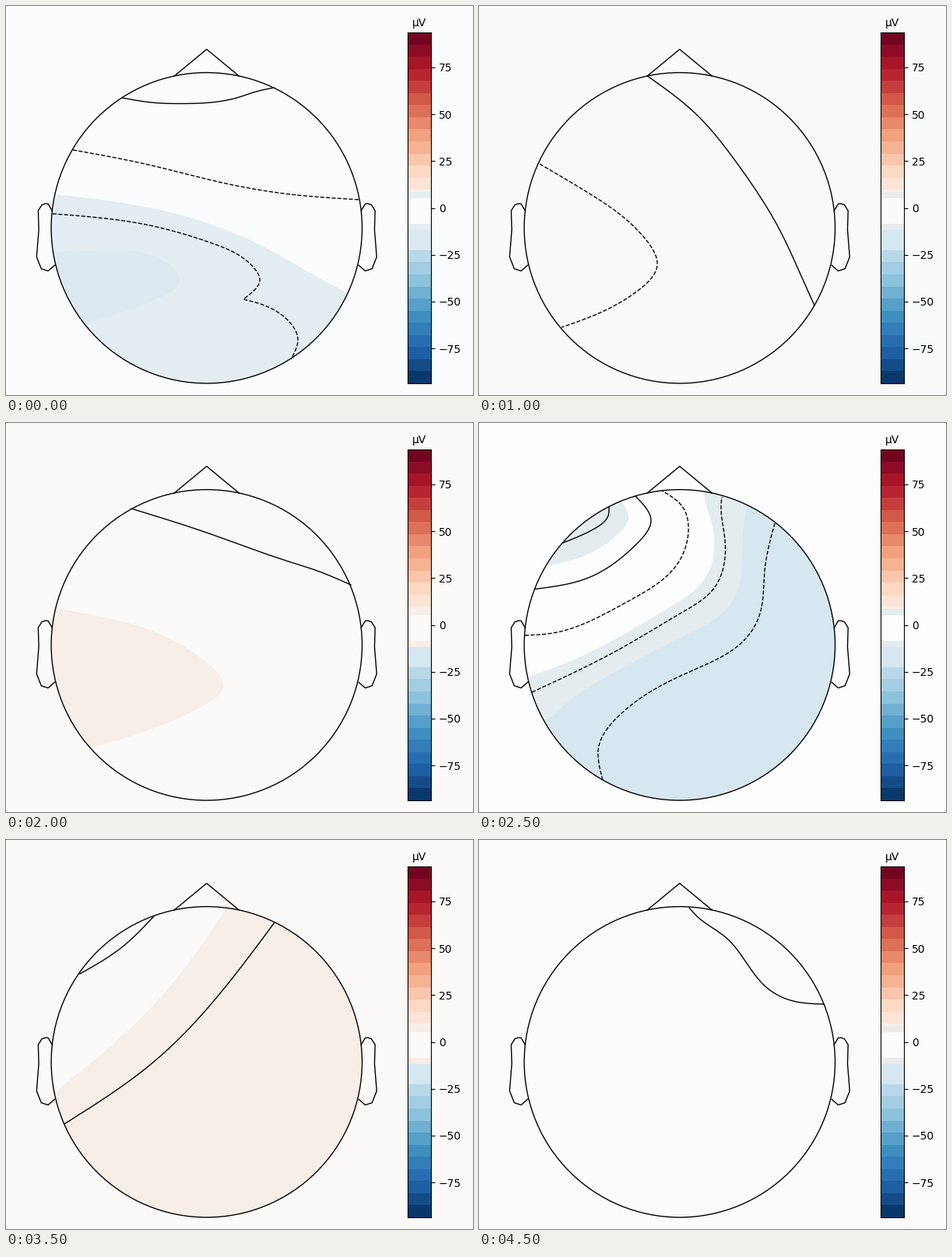
Write a matplotlib script that moves like this. It is 600 px wide and 500 px high and loops after 5000 ms.

```python
import matplotlib
import numpy as np
import matplotlib.pyplot as plt
from matplotlib.animation import FuncAnimation
from matplotlib.patches import Circle, Polygon

W, H, DPI = 600, 500, 100
CX, CY, R = 257.8, 285.3, 199.7
BAR_LEFT, BAR_TOP, BAR_BOTTOM = 516, 34, 485
VMAX, SHADES = 93.6, 29
SAMPLES = 160

# Background, tint next to zero, pale blue
COOL = ("#fbfcfe", "#e4edf2", "#dde9f1")
GREY = ("#f9fbfa", "#eaeaea", "#d5e7f0")
WARM = ("#fcfaf8", "#f7eee8", "#d5e7f0")
ICE = ("#fdfdfd", "#e4ecf0", "#d7e7ef")
ROSE = ("#fdfdfd", "#f8ece7", "#d5e7f0")
PALE = ("#fbfbfb", "#eaeaea", "#d5e7f0")
PEACH, CORAL = "#fae4d8", "#fbddce"


def curve(*points):
    """Natural cubic spline through a few key points."""
    p = np.array(points, float)
    h = np.hypot(*np.diff(p, axis=0).T)
    t = np.r_[0, np.cumsum(h)]
    slope = np.diff(p, axis=0) / h[:, None]
    a, rhs = np.eye(len(p)), np.zeros_like(p)
    for i in range(1, len(p) - 1):
        a[i, i - 1:i + 2] = h[i - 1], 2 * (h[i - 1] + h[i]), h[i]
        rhs[i] = 6 * (slope[i] - slope[i - 1])
    m = np.linalg.solve(a, rhs)
    s = np.linspace(0, t[-1], SAMPLES)
    k = np.clip(np.searchsorted(t, s) - 1, 0, len(h) - 1)
    v = ((s - t[k]) / h[k])[:, None]
    u = 1 - v
    bend = (u**3 - u) * m[k] + (v**3 - v) * m[k + 1]
    return u * p[k] + v * p[k + 1] + bend * h[k, None]**2 / 6


def between(a, b, start, end):
    """Curve lying part of the way from a to b."""
    t = np.linspace(start, end, SAMPLES)[:, None]
    return (1 - t) * a + t * b


def region(edge):
    """Close an edge clockwise along an arc just outside the head."""
    ends = edge[[-1, 0]] - (CX, CY)
    a, b = np.arctan2(ends[:, 1], ends[:, 0])
    if b < a:
        b += 2 * np.pi
    s = np.linspace(a, b, 80)
    arc = np.c_[CX + 1.06 * R * np.cos(s), CY + 1.06 * R * np.sin(s)]
    return np.vstack([edge, arc])


# Each state returns palette, fills, solid contours, dashed contours.
def left_low():
    slope = curve((64, 242), (210, 265), (330, 309), (396, 346), (437, 368))
    lobe = curve((61, 316), (130, 314), (205, 329), (224, 350), (180, 382),
                 (109, 406))
    zero = curve((149, 118), (187, 124), (226, 125.5), (300, 117), (318, 111),
                 (344, 105))
    upper = curve((86, 185), (183, 204), (275, 226.5), (365, 242), (455, 249))
    bend = curve((60, 267), (180, 281), (265, 305), (318, 336), (326, 350),
                 (305, 377))
    tail = curve((305, 377), (350, 394), (375, 430), (366, 454))
    lower = np.vstack([bend, tail])
    return COOL, [(COOL[1], slope), (COOL[2], lobe)], [zero], [upper, lower]


def right_rise():
    edge = curve((70, 220), (200, 165), (250, 87))
    line = curve((64, 330), (220, 235), (330, 99))
    return WARM, [(WARM[1], edge)], [line], []


def split():
    zero = curve((216.5, 90), (280, 140), (330, 200), (388, 291), (410, 338),
                 (431, 385))
    lobe = curve((78, 203), (145, 243), (210, 295), (229, 333), (200, 369),
                 (106, 413))
    return GREY, [], [zero], [lobe]


def wide_rise():
    edge = curve((61, 255), (190, 180), (275, 87))
    low = curve((118, 143), (155, 122), (192, 97))
    high = curve((66, 335), (250, 235), (402, 147))
    return WARM, [(WARM[1], edge)], [low, high], []


def left_high():
    lobe = curve((63, 238), (160, 258), (245, 298), (279, 339), (245, 368),
                 (108, 417))
    zero = curve((161, 110), (258, 141), (360, 177), (400, 190), (443, 208))
    return WARM, [(WARM[1], lobe)], [zero], []


def right_low():
    peak = curve((167, 108), (166, 119), (148, 136), (108, 154))
    ring = curve((201, 94), (221, 125), (200, 158), (135, 201), (72, 213.5))
    a = curve((59, 273), (95, 270), (190, 230), (255, 181), (269, 140),
              (263, 110), (235, 87))
    b = curve((68, 346), (180, 291), (260, 244), (303, 211), (316, 150),
              (311, 106), (312, 95))
    c = curve((159, 459), (154, 415), (180, 376), (270, 320), (347, 272),
              (361, 245), (367, 190), (380, 129))
    fills = [(ICE[1], between(peak, ring, 0.48, 0.48)),
             (ICE[1], between(a, b, 0.72, 0.7)),
             (ICE[2], between(b, c, 0.28, 0.47))]
    return ICE, fills, [peak, ring], [a, b, c]


def level():
    zero = curve((367, 119), (343, 165), (325, 236), (312, 280), (310, 318),
                 (258, 369), (190, 405), (174, 421), (173, 466))
    return GREY, [], [zero], []


def slow_rise():
    edge = curve((62, 325), (205, 195), (283, 88))
    low = curve((95, 172), (150, 137), (190, 98))
    high = curve((75, 365), (190, 285), (345, 106))
    return WARM, [(WARM[1], edge)], [low, high], []


def right_high():
    a = curve((90, 177), (125, 151), (190, 121), (240, 112), (335, 102))
    b = curve((93, 398), (150, 354), (200, 290), (245, 232), (290, 207),
              (424, 174))
    c = curve((203, 477), (172, 446), (168, 418), (220, 383), (284, 345),
              (340, 291), (380, 273), (455, 250))
    peak = curve((388, 438), (352, 402), (385, 365), (449, 338))
    fills = [(ROSE[1], between(a, b, 0.89, 0.7)),
             (PEACH, between(b, c, 0.2, 0.55)), (CORAL, peak)]
    return ROSE, fills, [a, b, c], []


def calm():
    zero = curve((270, 87), (280, 98), (318, 126), (370, 190), (400, 206),
                 (443, 211))
    return PALE, [], [zero], []


STATES = [left_low(), right_rise(), split(), wide_rise(), left_high(),
          right_low(), level(), slow_rise(), right_high(), calm()]

fig = plt.figure(figsize=(W / DPI, H / DPI), dpi=DPI)
ax = fig.add_axes([0, 0, 1, 1])
ax.set(xlim=(0, W), ylim=(H, 0))
ax.axis("off")

pen = dict(color="black", lw=1, zorder=5)
head = ax.add_patch(Circle((CX, CY), R, fill=False, ec="black", lw=1, zorder=5))
ax.plot(CX + R * np.array([-0.208, 0, 0.208]),
        CY - R * np.array([0.978, 1.15, 0.978]), **pen)
ear_x = np.array([.497, .510, .518, .5299, .5419, .54, .547, .532, .510, .489])
ear_y = np.array([.0555, .0775, .0783, .0746, .0555, -.0055, -.0932, -.1313,
                  -.1384, -.1199])
for side in (-1, 1):
    ax.plot(CX + side * 2 * R * ear_x, CY - 2 * R * ear_y, **pen)

bar = fig.add_axes([BAR_LEFT / W, 1 - BAR_BOTTOM / H, 30 / W,
                    (BAR_BOTTOM - BAR_TOP) / H])
bar.set(xlim=(0, 1), ylim=(-VMAX, VMAX), xticks=[], yticks=range(-75, 76, 25))
bar.yaxis.tick_right()
bar.set_title("µV", fontsize=10)


def band(low, high, shade):
    return bar.axhspan(low, high, lw=0, antialiased=False, color=shade)


cmap = matplotlib.colormaps["RdBu_r"]
steps = np.linspace(-VMAX, VMAX, SHADES + 1)
for k in range(SHADES):
    band(steps[k], steps[k + 1], cmap((k + 0.5) / SHADES))
# Blue, tint, blank and tint bands around zero follow the palette
limits = [-22.2, -11.8, -8.4, 5, 8.5]
tinted = [band(a, b, "white") for a, b in zip(limits, limits[1:])]

drawn = []


def draw(i):
    while drawn:
        drawn.pop().remove()
    (back, tint, blue), fills, solid, dashed = STATES[i]
    fig.set_facecolor(back)
    for patch, shade in zip(tinted, (blue, tint, back, tint)):
        patch.set_color(shade)
    for shade, edge in fills:
        patch = ax.add_patch(Polygon(region(edge), fc=shade, lw=0, zorder=2))
        patch.set_clip_path(head)
        drawn.append(patch)
    for style, lines in (("-", solid), ("--", dashed)):
        for line in lines:
            drawn.extend(ax.plot(*line.T, style, **pen))
    return drawn


anim = FuncAnimation(fig, draw, frames=len(STATES), interval=500, repeat=True,
                     repeat_delay=0, init_func=lambda: draw(0), blit=False)
plt.show()
```
